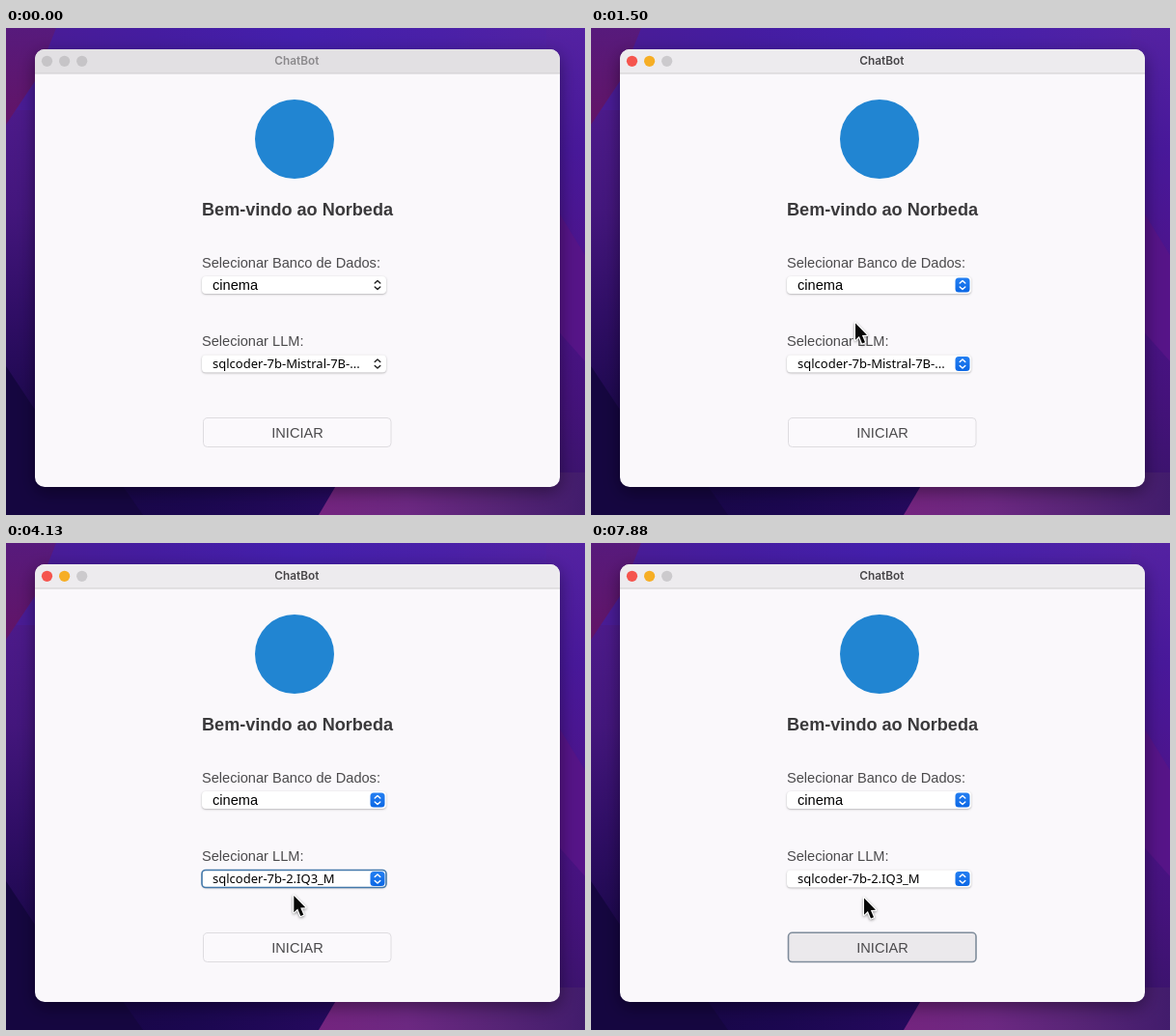
An HTML page with a canvas that plays this animation: 600 by 504 pixels, repeating every 8000 ms.

```html
<!DOCTYPE html>
<html lang="pt">
<head>
<meta charset="utf-8">
<title>ChatBot</title>
<style>
html, body { margin: 0; width: 100%; height: 100%; overflow: hidden; background: #2c1266; }
canvas { display: block; width: 600px; height: 504px; }
</style>
</head>
<body>
<canvas id="stage" width="600" height="504"></canvas>
<script>
const ctx = document.getElementById('stage').getContext('2d');
const LOOP = 8000, STEP = 125;
const ARIAL = '"Liberation Sans", Arial, sans-serif';
const LIST = '500 13px "Noto Sans", sans-serif';
const ROW = 16.3;
const MODELS = [
  'sqlcoder-7b-Mistral-7B-Instruct-v0.2-slerp.Q3_K_L',
  'sqlcoder-7b-2.IQ3_M',
  'tinyllama-1.1b-chat-v1.0.Q8_0'
];
const EVENTS = { activate: 1375, open: 1875, choose: 4125, press: 5375 };

// Pointer stops: time, x, y
const PATH = [
  [375, 420, 506], [875, 281, 267.5], [1250, 281, 267.5], [1750, 267, 343.5],
  [2375, 267, 343.5], [3000, 419, 355.5], [3375, 419, 355.5], [3750, 300, 365],
  [4250, 298, 365], [4875, 320, 418.5], [5500, 320, 418.5], [6000, 283, 367.5]
];

function pointer(t) {
  if (t < PATH[0][0]) return null;
  const i = PATH.findIndex(p => p[0] > t);
  if (i < 0) return PATH[PATH.length - 1].slice(1);
  const [t0, x0, y0] = PATH[i - 1], [t1, x1, y1] = PATH[i];
  const k = (t - t0) / (t1 - t0), e = k * k * (3 - 2 * k);
  return [x0 + (x1 - x0) * e, y0 + (y1 - y0) * e];
}

function text(str, x, y, font, color, align = 'left') {
  ctx.font = font;
  ctx.fillStyle = color;
  ctx.textAlign = align;
  ctx.fillText(str, x, y);
}

function box(x, y, w, h, r, fill, stroke, line = 1) {
  ctx.beginPath();
  ctx.roundRect(x, y, w, h, r);
  if (fill) { ctx.fillStyle = fill; ctx.fill(); }
  if (stroke) { ctx.strokeStyle = stroke; ctx.lineWidth = line; ctx.stroke(); }
}

function shadowed(color, blur, dy, draw) {
  ctx.save();
  ctx.shadowColor = color;
  ctx.shadowBlur = blur;
  ctx.shadowOffsetY = dy;
  draw();
  ctx.restore();
}

function dot(x, y, r, color) {
  ctx.beginPath();
  ctx.arc(x, y, r, 0, Math.PI * 2);
  ctx.fillStyle = color;
  ctx.fill();
}

function polyline(pts, color, width) {
  ctx.beginPath();
  pts.forEach(p => ctx.lineTo(...p));
  ctx.strokeStyle = color;
  ctx.lineWidth = width;
  ctx.lineCap = ctx.lineJoin = 'round';
  ctx.stroke();
}

function gradient(x0, y0, x1, y1, colors) {
  const g = ctx.createLinearGradient(x0, y0, x1, y1);
  colors.forEach((c, i) => g.addColorStop(i / (colors.length - 1), c));
  return g;
}

function area(pts, fill) {
  ctx.beginPath();
  pts.forEach(p => ctx.lineTo(...p));
  ctx.closePath();
  ctx.fillStyle = fill;
  ctx.fill();
}

function wallpaper() {
  ctx.fillStyle = gradient(0, 0, 600, 0, ['#4a1c94', '#451ca0', '#441fac', '#4a20a8', '#5422a2']);
  ctx.fillRect(0, 0, 600, 504);
  ctx.fillStyle = gradient(0, 85, 0, 504, ['#4c1a8a', '#43167c', '#300e66', '#1d084e', '#15063f']);
  ctx.fillRect(0, 85, 40, 419);
  area([[0, 0], [52, 0], [30, 55], [0, 100]], gradient(0, 0, 0, 100, ['#571a7c', '#621466']));
  ctx.fillStyle = gradient(560, 0, 600, 504, ['#5422a2', '#48189a', '#4c148c', '#45127c', '#381468']);
  ctx.fillRect(560, 0, 40, 504);
  area([[560, 170], [600, 235], [600, 345], [560, 300]], '#561488');
  ctx.fillStyle = gradient(0, 0, 600, 0, ['#150640', '#1b0750', '#290a64', '#300c6c']);
  ctx.fillRect(0, 460, 600, 44);
  area([[0, 350], [30, 395], [118, 470], [142, 504], [0, 504]], '#150640');
  area([[350, 460], [600, 460], [600, 504], [324, 504]],
    gradient(324, 0, 600, 0, ['#74247f', '#6c2882', '#572476', '#421c6c']));
}

function chevrons(cx, cy, active) {
  if (active) box(cx - 7.5, cy - 7.5, 15, 15, 3.5, gradient(0, cy - 8, 0, cy + 8, ['#2580f2', '#0a66e4']));
  const c = active ? '#fff' : '#222';
  for (const s of [-1, 1])
    polyline([[cx - 2.8, cy + s * 1.9], [cx, cy + s * 4.6], [cx + 2.8, cy + s * 1.9]], c, 1.4);
}

function select(y, label, font, active, focus) {
  shadowed('rgba(0,0,0,.3)', 2, 0.7, () => box(203, y, 191, 18, 4, '#fff'));
  if (focus) box(203, y, 191, 18, 4, null, '#4379ab', 1.6);
  text(label, 214, y + (font === LIST ? 13.5 : 14), font, '#000');
  chevrons(385, y + 9, active);
}

function popup(row) {
  shadowed('rgba(0,0,0,.25)', 10, 2, () => box(193, 335, 332, 56, 1, '#fefdfe'));
  box(193, 335, 332, 56, 1, null, '#d8d6da', 0.7);
  ctx.fillStyle = '#0a60cf';
  ctx.fillRect(193, 339.5 + row * ROW, 332, ROW);
  MODELS.forEach((m, i) =>
    text(m, 214, 352 + i * ROW, LIST, i === row ? '#fff' : '#000'));
  polyline([[199.5, 348.3], [201.8, 351.3], [206, 343.7]], row === 0 ? '#fff' : '#111', 1.5);
}

function arrow(x, y) {
  const pts = [[0, 0], [0, 17.2], [3.9, 13.6], [7, 21], [10, 19.7], [6.9, 12.5], [12, 12.2]];
  ctx.save();
  ctx.translate(x, y);
  shadowed('rgba(0,0,0,.35)', 3, 1, () => {
    area(pts, '#fff');
    polyline([...pts, pts[0]], '#fff', 2.4);
  });
  area(pts, '#080808');
  ctx.restore();
}

function draw(time) {
  const t = Math.floor(time / STEP) * STEP;
  const active = t >= EVENTS.activate;
  const open = t >= EVENTS.open && t < EVENTS.choose;
  const chosen = t >= EVENTS.choose;
  const pressed = t >= EVENTS.press;
  const pos = pointer(t);

  wallpaper();
  shadowed('rgba(0,0,0,.4)', 18, 5, () => box(30, 22, 544, 453, 10, '#faf8fb'));
  box(30, 22, 544, 25, [10, 10, 0, 0], active ? '#edebee' : '#e2e0e3');
  ctx.fillStyle = '#cfcdd0';
  ctx.fillRect(30, 46.5, 544, 1);
  const lights = active ? ['#f5544d', '#f6ae25', '#cccacd'] : ['#c6c4c7', '#c6c4c7', '#c6c4c7'];
  lights.forEach((c, i) => dot(42.5 + i * 18.1, 34.3, 5.6, c));
  text('ChatBot', 301.3, 38.2, '600 11.8px Inter, sans-serif', active ? '#464447' : '#8b898c', 'center');

  dot(299, 115, 41, '#2185d2');
  text('Bem-vindo ao Norbeda', 203, 194, 'bold 18.1px ' + ARIAL, '#3a393b');

  const body = '14.6px ' + ARIAL;
  text('Selecionar Banco de Dados:', 203, 247.5, body, '#4b4a4c');
  select(257, 'cinema', body, active, false);
  text('Selecionar LLM:', 203, 329, body, '#4b4a4c');
  select(338.5, chosen ? MODELS[1] : 'sqlcoder-7b-Mistral-7B-...', LIST, active, chosen && !pressed);

  if (pressed) box(204.5, 403.3, 194.5, 30.2, 4, '#ebe9ec', '#7f8c9b', 1.6);
  else box(204.5, 403.5, 194.5, 30, 4, '#fbf9fc', '#dedce0', 1);
  text('INICIAR', 302, 423.5, body, '#4b4a4c', 'center');

  if (open) popup(pos[1] < 358 ? 0 : 1);
  if (pos) arrow(...pos);
}

const start = performance.now();
function tick(now) {
  draw(Math.max(0, now - start) % LOOP);
  requestAnimationFrame(tick);
}
draw(0);
requestAnimationFrame(tick);
</script>
</body>
</html>
```
